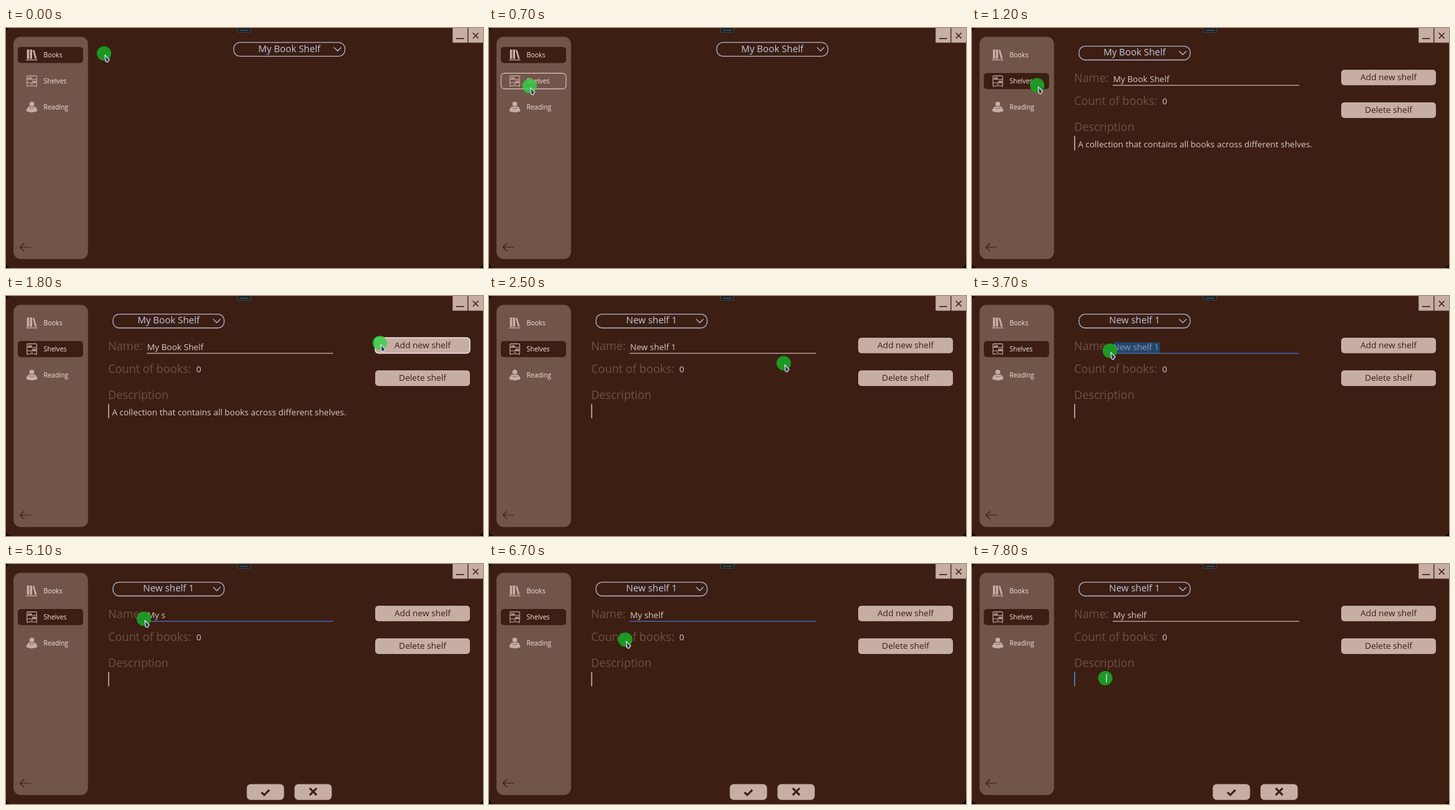
Animation of 730x368 px, one loop 8000 ms. Source, as an HTML page:

```html
<!DOCTYPE html>
<html lang="en">
<head>
<meta charset="utf-8">
<title>Book shelf</title>
<style>
  html, body { margin: 0; width: 100%; height: 100%; overflow: hidden; background: #060505; }
  svg { display: block; width: 100vw; height: 100vh; font-family: "Open Sans", "Noto Sans", sans-serif; }
  .nav { font-size: 10.1px; fill: #eee2dc; }
  .label { font-size: 17.3px; fill: #6f5045; }
  .value { font-size: 13px; fill: #dac9c1; }
  .title { font-size: 14.4px; fill: #c3c6e2; text-anchor: middle; }
  .btn { font-size: 13.1px; fill: #3c1e12; text-anchor: middle; }
  .pale { fill: #c7aea4; }
  .line { fill: none; stroke: #c7aea4; }
  .dark { fill: none; stroke: #3c1e12; }
</style>
</head>
<body>
<svg viewBox="0 0 730 368" preserveAspectRatio="none">
  <rect width="730" height="368" fill="#060505"/>
  <path d="M0 8Q0 0 8 0H730V358Q730 368 720 368H10Q0 368 0 358Z" fill="#3c1e12"/>

  <rect x="354.5" y="-2" width="20" height="8.5" fill="#1f2023" stroke="#2f4650"/>
  <path d="M358 3.5H371" stroke="#43707f"/>

  <path class="pale" d="M683.5 0H706.3V22.5H683.5ZM707.6 0H730V22.5H707.6Z"/>
  <path class="dark" d="M689 16.3H701M714.5 7.5L723 16M723 7.5L714.5 16" stroke-width="1.5"/>

  <rect x="11.5" y="13.5" width="114" height="340.7" rx="11" fill="#725549"/>
  <rect id="sel" x="18" y="29" width="100" height="24.7" rx="5" fill="#3c1e12"/>
  <rect id="hoverNav" x="18.5" y="69.4" width="99.3" height="24" rx="5" fill="none" stroke="#d3c0b8" stroke-width="1.1"/>

  <path class="pale" d="M32 33H35.4V47.3H32ZM36.6 33H40V47.3H36.6ZM40.8 34.2L43.2 33.4L47 46.6L44.4 47.4ZM30.5 48.3H48V49.6H30.5Z"/>
  <g class="line" stroke-width="1.1">
    <rect x="32.1" y="73.4" width="14.8" height="15.4" rx="1.2"/>
    <path d="M32 78.8H47M32 84H47M38.2 86.4H40.8M32.6 89V90.4M46.4 89V90.4"/>
    <path d="M34.6 75.4V78.6M36.6 75.4V78.6M38.6 75.4V78.6M41 80.8V84M43 80.8V84M45 80.8V84" stroke-width="1.5"/>
  </g>
  <g class="pale">
    <circle cx="39.5" cy="116.6" r="3.7"/>
    <path d="M35 120Q39.5 122 44 120L48 125.2Q48 128.6 44.5 128.6L39.5 129.4L34.5 128.6Q31 128.6 31 125.2Z"/>
    <path d="M35.2 122.6L39.5 124L43.8 122.6" fill="none" stroke="#725549" stroke-width=".7"/>
  </g>
  <text class="nav" x="57.4" y="45.2">Books</text>
  <text class="nav" x="57.4" y="85.2">Shelves</text>
  <text class="nav" x="57.4" y="125.2">Reading</text>
  <path class="dark" d="M38.5 336H21.5M27.5 330L21.5 336L27.5 342" stroke-width="1.2"/>

  <g id="combo">
    <rect x="348.5" y="22.1" width="170.2" height="21.2" rx="9.5" fill="none" stroke="#aeb2cd" stroke-width="1.3"/>
    <path d="M501.8 29.6L507.4 35.2L513 29.6" fill="none" stroke="#c3c6e2" stroke-width="1.2"/>
    <text id="title" class="title" x="433.6" y="36.8"></text>
  </g>

  <g id="page">
    <text class="label" x="156.2" y="83.4">Name:</text>
    <text class="label" x="156.2" y="118.2">Count of books:</text>
    <text class="label" x="156.2" y="158.3">Description</text>
    <rect id="mark" y="71" height="16" fill="#24466a"/>
    <text id="name" class="value" x="216" y="83.4"></text>
    <text class="value" x="291.2" y="117.4">0</text>
    <text id="desc" class="value" x="162.2" y="183.2">A collection that contains all books across different shelves.</text>
    <path id="under" d="M215.3 87.9H500.7" stroke-width="1.4"/>
    <path id="bar" d="M157.2 165.6V187.4" stroke-width="1.6"/>
    <path id="caret" d="M162.5 173V185" stroke="#d8c6be"/>

    <rect id="add" class="pale" x="565" y="64" width="145" height="23.8" rx="5" stroke-width="1.4"/>
    <text class="btn" x="637.5" y="80">Add new shelf</text>
    <rect class="pale" x="565" y="114" width="145" height="24" rx="5"/>
    <text class="btn" x="637.5" y="130.2">Delete shelf</text>

    <g id="confirm">
      <rect class="pale" x="368.5" y="337.5" width="57" height="24.3" rx="6"/>
      <rect class="pale" x="441.5" y="337.5" width="57" height="24.3" rx="6"/>
      <path class="dark" d="M391 350.2L395.2 354.2L403 346.4M464.8 343.8L475.4 354.4M475.4 343.8L464.8 354.4" stroke-width="3"/>
    </g>
  </g>

  <g id="pointer">
    <circle id="dot" r="11"/>
    <path id="arrow" d="M1.5 2.5L2.3 12L5.3 13.5L8.3 9.3Z" fill="#2c4258" stroke="#e6e2e8" stroke-width="1.2" stroke-linejoin="round"/>
    <path id="beam" d="M1.8 -6.5V6.5" stroke="#c3d6ee" stroke-width="1.5"/>
  </g>
</svg>
<script>
const LOOP = 8000, STEP = 100;
const $ = id => document.getElementById(id);
const set = (id, attrs) => { for (const k in attrs) $(id).setAttribute(k, attrs[k]); };
const show = (id, on) => set(id, { opacity: +on });
const within = (t, a, b) => t >= a && t < b;

// time, x, y of the pointer
const path = [
  [0, 150, 39], [200, 150, 39], [500, 62, 89],
  [1100, 62, 89], [1700, 572, 72],
  [2000, 572, 72], [2500, 451, 103], [2800, 296, 80],
  [2900, 292, 80], [3300, 211, 84],
  [6500, 211, 84], [7000, 204, 175], [LOOP, 204, 175]
];
const presses = [[700, 1100], [1800, 2000], [2900, 3600], [7000, 7200]];
const beams = [[2700, 3300], [6900, LOOP]];

// time, text of the name field
const names = [
  [0, "My Book Shelf"], [2000, "New shelf 1"], [4300, "M"], [4700, "My"], [4800, "My "],
  [5100, "My s"], [5300, "My sh"], [5500, "My she"], [5800, "My shel"], [6100, "My shelf"]
];

const during = (t, spans) => spans.some(([a, b]) => within(t, a, b));
const latest = (t, table) => table.filter(row => row[0] <= t).pop()[1];

function pointerAt(t) {
  const i = path.findIndex(p => p[0] > t);
  const [t0, x0, y0] = path[i - 1], [t1, x1, y1] = path[i];
  const u = (t - t0) / (t1 - t0);
  const e = within(t, 2000, 2900) ? u : u * u * (3 - 2 * u);
  return [x0 + (x1 - x0) * e, y0 + (y1 - y0) * e];
}

function draw(t) {
  const [x, y] = pointerAt(t);
  const shelves = t >= 1100;
  const focus = within(t, 2900, 7000);
  const marked = within(t, 2900, 4300);
  const pressed = during(t, presses);
  const beam = during(t, beams);

  set("sel", { y: shelves ? 69 : 29 });
  show("hoverNav", within(t, 500, 1100));
  set("combo", { transform: shelves ? "translate(-184.8 5.7)" : "" });
  $("title").textContent = t < 2000 ? "My Book Shelf" : "New shelf 1";

  show("page", shelves);
  $("name").textContent = latest(t, names);
  $("name").style.fill = marked && t >= 3200 ? "#8797b5" : "";
  const left = Math.max(217, Math.min(287.5, x));
  set("mark", { x: left, width: marked ? 287.5 - left : 0 });
  show("desc", t < 2000);
  set("under", { stroke: focus ? "#4a73c4" : "#c7aea4" });
  set("bar", { stroke: t >= 7000 ? "#4a86d8" : "#c7aea4" });
  show("caret", within(t, 7200, 7800));
  set("add", { stroke: within(t, 1700, 2100) ? "#f3e8e1" : "none" });
  set("confirm", { opacity: t < 4300 ? 0 : t < 4400 ? 0.6 : 1 });

  set("pointer", { transform: `translate(${x} ${y})` });
  set("dot", { fill: pressed ? "#2ed544" : "#1ba024", "fill-opacity": pressed ? 0.8 : 0.94 });
  show("arrow", !beam);
  show("beam", beam);
}

const start = performance.now();
function tick() {
  const t = (performance.now() - start) % LOOP;
  draw(Math.floor(t / STEP) * STEP);
  requestAnimationFrame(tick);
}
tick();
</script>
</body>
</html>
```
